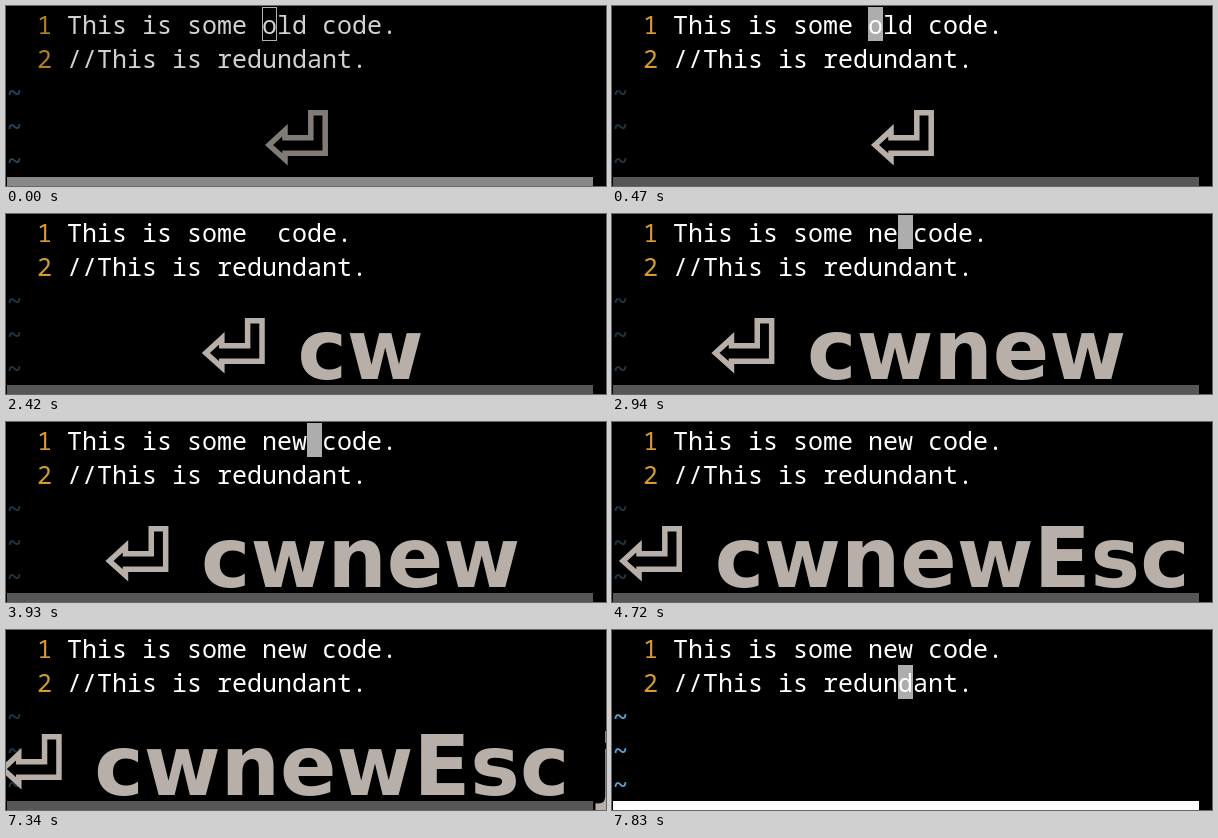
An HTML page that plays this animation: 600 by 180 pixels, repeating every 8 s.

```html
<!DOCTYPE html>
<html lang="en">
<head>
<meta charset="utf-8">
<title>Changing a word in an editor</title>
<style>
  html, body { margin: 0; width: 100%; height: 100%; overflow: hidden; background: #000; }
  svg { display: block; width: 600px; height: 180px; background: #000; }
  text { white-space: pre; }
  .code { font: 500 25px "Noto Sans Mono", monospace; fill: #fff; }
  .num { fill: #d79b2f; }
  .tilde { font-weight: 700; fill: #5b9fcf; }
  #keys { font: 700 83.3px "DejaVu Sans", sans-serif; fill: #b8b0a8; }
  #enter { fill: none; stroke: #b8b0a8; stroke-width: 5.5; stroke-miterlimit: 6; }
</style>
</head>
<body>
<svg viewBox="0 0 600 180">
  <rect x="1" y="171" width="586" height="9" fill="#fff"/>
  <g id="editor" class="code">
    <rect id="cursor" width="15" height="34"/>
    <text class="num" x="31" y="28">1</text>
    <text class="num" x="31" y="62">2</text>
    <text id="line" x="61" y="28"></text>
    <text x="61" y="62">//This is redundant.</text>
    <text class="tilde" x="1" y="96">~</text>
    <text class="tilde" x="1" y="130">~</text>
    <text class="tilde" x="1" y="164">~</text>
  </g>
  <g id="overlay">
    <rect y="70" width="600" height="110" opacity=".66"/>
    <g id="typed">
      <path id="enter" d="M45.8 2.8H60.2V43.2H20V49.4L4 35L20 20.2V27.8H45.8Z"/>
      <text id="keys" x="95.6" y="61"></text>
    </g>
  </g>
</svg>
<script>
const LOOP = 8000;
const $ = id => document.getElementById(id);
const [editor, cursor, line, overlay, typed, keys] =
  ["editor", "cursor", "line", "overlay", "typed", "keys"].map($);

// Each step lists only what changes: word, keys, cursor col/row/on, focus, overlay strength.
const steps = [
  [0, { word: "old", keys: "", col: 13, row: 0, on: true, focus: false, show: .7 }],
  [40, { show: .85 }],
  [80, { show: 1 }],
  [470, { focus: true }],
  [940, { on: false }],
  [1440, { on: true }],
  [1860, { keys: "c" }],
  [1940, { keys: "cw" }],
  [1980, { word: "" }],
  [2420, { on: false }],
  [2750, { keys: "cwn" }],
  [2790, { word: "n", col: 14, on: true }],
  [2840, { keys: "cwne" }],
  [2880, { word: "ne", col: 15 }],
  [2940, { keys: "cwnew" }],
  [2980, { word: "new", col: 16 }],
  [3430, { on: false }],
  [3930, { on: true }],
  [4230, { keys: "cwnewEsc " }],
  [4270, { col: 15 }],
  [4720, { on: false }],
  [4860, { keys: "cwnewEsc j" }],
  [4900, { row: 1, on: true }],
  [5350, { on: false }],
  [5850, { on: true }],
  [6350, { on: false }],
  [6840, { on: true }],
  [7340, { on: false }],
  [7380, { show: .67 }],
  [7430, { show: .33 }],
  [7470, { show: 0 }],
  [7830, { on: true }]
];

let state = {};
const states = steps.map(([at, change]) => [at, state = { ...state, ...change }]);

function drawCursor({ col, row, on, focus }) {
  const inset = focus ? 0 : .5;
  const attrs = {
    x: 61 + col * 15 + inset, y: 1 + row * 34 + inset,
    width: 15 - 2 * inset, height: 34 - 2 * inset,
    fill: focus ? "#adadad" : "none",
    stroke: focus ? "none" : "#d8d8d8",
    visibility: on ? "visible" : "hidden"
  };
  for (const name in attrs) cursor.setAttribute(name, attrs[name]);
}

function draw(s) {
  line.textContent = `This is some ${s.word} code.`;
  editor.setAttribute("opacity", s.focus ? 1 : .82);
  drawCursor(s);
  overlay.setAttribute("opacity", s.show);
  keys.textContent = s.keys;
  // The typed keys stay centred as they grow.
  const width = s.keys ? keys.getComputedTextLength() : 0;
  typed.setAttribute("transform", `translate(${259 - width / 2} 104)`);
}

let shown;
const start = performance.now();
function tick() {
  const t = (performance.now() - start) % LOOP;
  const now = states.findLast(([at]) => at <= t)[1];
  if (now !== shown) draw(shown = now);
  requestAnimationFrame(tick);
}
tick();
</script>
</body>
</html>
```
